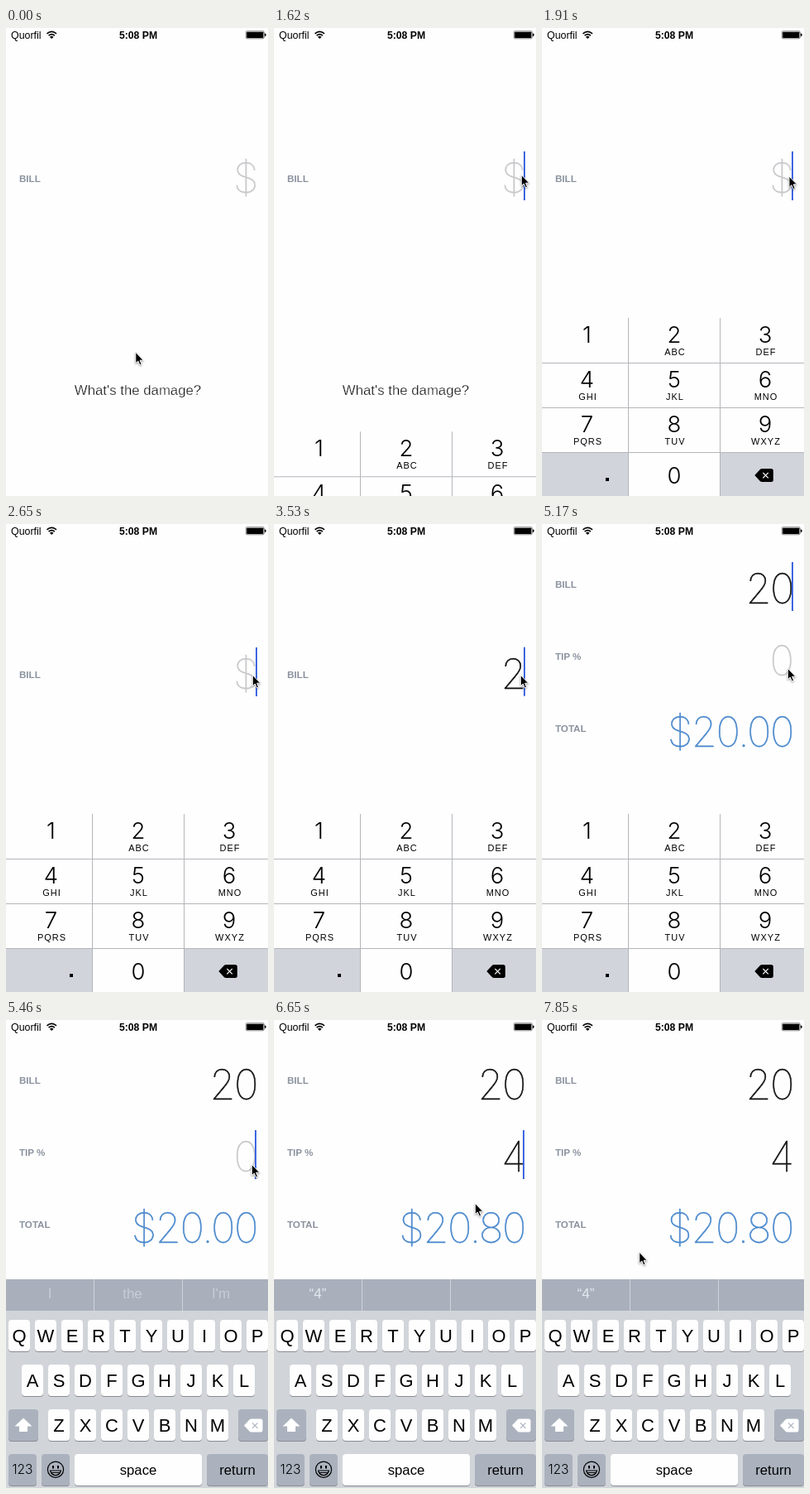
Recreate the animation shown at these times as an HTML page. Size 317x565 px, loop 8 s.

```html
<!DOCTYPE html>
<html lang="en">
<head>
<meta charset="utf-8">
<title>Tip calculator</title>
<style>
  html, body { margin: 0; height: 100%; overflow: hidden; background: #fefefe; }
  svg { display: block; width: 100vw; height: 100vh; }
  text { font-family: "Liberation Sans", Arial, sans-serif; white-space: pre; }
  .mid { text-anchor: middle; }
  .label { font-size: 11.6px; font-weight: bold; fill: #8a929e; }
  .big { font: 100 50px Inter, sans-serif; font-optical-sizing: none; letter-spacing: -1.5px;
    text-anchor: end; stroke-width: .6px; }
  .digit { font-family: Inter, sans-serif; font-weight: 350; }
  .ask { font-size: 16.8px; fill: #111; stroke: #fefefe; stroke-width: .35px; }
  .caret { fill: #3f66e0; }
  .sub { font-size: 11px; letter-spacing: 1px; }
  .line { stroke: #b4b6ba; }
</style>
</head>
<body>
<svg viewBox="0 0 317 565">
  <rect width="317" height="565" fill="#fefefe"/>
  <g id="status">
    <text x="6" y="13" font-size="12.4">Quorfil</text>
    <g fill="none" stroke="#000" stroke-width="1.7">
      <path d="M49.5 6.8Q55.2 1.8 61 6.8M51.6 9.1Q55.2 6 58.9 9.1"/>
      <path d="M55.2 13L52.9 10.7Q55.2 9 57.6 10.7Z" fill="#000" stroke="none"/>
    </g>
    <text x="160" y="13" class="mid" font-size="12.2" font-weight="bold">5:08 PM</text>
    <rect x="290.3" y="3.8" width="22" height="9" rx="1.5" fill="none" stroke="#000" stroke-width=".5"/>
    <rect x="291.2" y="4.7" width="20.2" height="7.2" rx=".6"/>
    <rect x="313" y="6.5" width="1.5" height="3.5" rx=".7"/>
  </g>
  <text class="ask mid" x="159.5" y="443">What's the damage?</text>

  <text class="label" id="billLabel" x="16">BILL</text>
  <text class="big" id="bill" x="304"></text>
  <g id="results">
    <text class="label" x="16" y="164">TIP %</text>
    <text class="big" id="tip" x="303.5" y="183"></text>
    <text class="label" x="16" y="251">TOTAL</text>
    <text class="big" id="total" x="304" y="269"></text>
  </g>
  <rect class="caret" id="caret" width="2" height="59"/>

  <g id="keypad"></g>
  <g id="keyboard"></g>

  <path id="cursor" d="M.3 .3V13.8L3.3 11L5.5 16L7.6 15.1L5.6 10.2H9.8Z"
    stroke="#fff" style="filter:drop-shadow(0 1px 1px #0006)"/>
</svg>
<script>
const $ = id => document.getElementById(id);
const clamp = v => Math.max(0, Math.min(1, v));
const smooth = v => (v = clamp(v)) * v * (3 - 2 * v);
const inOut = v => (v = clamp(v)) < .5 ? 4 * v ** 3 : 1 - 4 * (1 - v) ** 3;
const mid = (x, y, text, size, kind = '') =>
  `<text class="mid ${kind}" x="${x}" y="${y}" font-size="${size}">${text}</text>`;
const rect = (x, y, w, h, fill) =>
  `<rect x="${x}" y="${y}" width="${w}" height="${h}" fill="${fill}"/>`;
const backspace = (x, y, fill, cross) =>
  `<g transform="translate(${x} ${y})"><path fill="${fill}"
    d="M0 8L6.5 1Q7.5 0 9 0H20Q22.5 0 22.5 2.5V13.5Q22.5 16 20 16H9Q7.5 16 6.5 15Z"/>
    <path d="M10 4.8l6.5 6.5m0-6.5l-6.5 6.5" stroke="${cross}" stroke-width="1.2"/></g>`;

function keypad() {
  const letters = ['', 'ABC', 'DEF', 'GHI', 'JKL', 'MNO', 'PQRS', 'TUV', 'WXYZ'];
  const centers = [54.5, 160, 270];
  let s = rect(0, 0, 317, 215, '#fefefe')
    + rect(0, 162, 104, 53, '#d1d4da') + rect(216, 162, 101, 53, '#d1d4da')
    + '<path class="line" d="M104.5 0V215M215.5 0V215M0 54.5H317M0 108.5H317M0 162.5H317"/>';
  letters.forEach((sub, i) => {
    const x = centers[i % 3], y = 54 * Math.floor(i / 3);
    s += mid(x, y + 30, i + 1, 27.5, 'digit') + mid(x + 1, y + 45, sub, 11, 'sub');
  });
  return s + mid(160, 200, 0, 27.5, 'digit') + rect(77, 193, 4, 4, '#000')
    + backspace(257.3, 182, '#000', '#fff');
}

function keyboard() {
  const grey = '#abb2be';
  const key = (x, y, w, fill, label = '', size = 22, kind = '') =>
    `<rect x="${x}" y="${y + 1}" width="${w}" height="38" rx="4" fill="#888c92"/>
     <rect x="${x}" y="${y}" width="${w}" height="38" rx="4" fill="${fill}"/>`
    + mid(x + w / 2, y + 18.7 + size * .36, label, size, kind);
  let s = rect(0, 313, 317, 252, '#d1d5da') + rect(0, 313, 317, 38, '#a9b0bc')
    + '<path d="M106.5 313V351M213.5 313V351" stroke="#cfd3da"/>';
  [['QWERTYUIOP', 3], ['ASDFGHJKL', 19], ['ZXCVBNM', 51]].forEach(([row, x], r) =>
    [...row].forEach((c, i) => s += key(x + 32 * i, 362 + 54 * r, 26, '#fefefe', c)));
  s += key(3, 470, 36, grey) + key(281, 470, 36, grey) + key(3, 524, 34, grey, '123', 15.5, 'digit')
    + key(43, 524, 34, grey) + key(83, 524, 154, '#fefefe', 'space', 16.7)
    + key(243, 524, 74, grey, 'return', 16.7)
    + '<path fill="#fff" d="M21 480.5L31.5 490.5H26V497H16V490.5H10.5Z"/>'
    + backspace(288, 481.5, '#fff', grey)
    + `<g fill="none" stroke="#000" stroke-width="1.2"><circle cx="60" cy="542.7" r="9.6"/>
       <path d="M53.6 544H66.4Q65 549.6 60 549.6T53.6 544ZM55 546.5H65"/>
       <path d="M57 538v3.4M63 538v3.4" stroke-width="2"/></g><g id="hints" fill="#e6e9ee">`;
  [53, 153, 260].forEach(x => s += mid(x, 336, '', 17));
  return s + '</g>';
}

$('keypad').innerHTML = keypad();
$('keyboard').innerHTML = keyboard();
const hints = [...$('hints').children];

// All times below are counted in ticks of 148 ms.
const LOOP = 8000, TICK = 148;
const path = [[4, 156.5, 391], [10, 299, 177], [12, 299, 177], [15, 298, 182], [33, 298, 182],
  [35, 297, 174], [43, 297, 174], [45, 243, 221], [47, 117.5, 281], [52, 117.5, 281], [53, 117.5, 280]];
const blinks = [[0, 0], [10, 1], [15, .5], [16, 0], [18, 1], [21, .5], [22, 0], [24, 1], [31, .5], [32, 0],
  [34, 1], [40, .5], [41, 0], [42, 1], [46, .5], [47, 0], [49, 1], [53, 0]];

function cursorAt(k) {
  const i = path.findIndex(p => p[0] > k);
  if (i < 1) return i ? path.at(-1).slice(1) : path[0].slice(1);
  const [a, b] = [path[i - 1], path[i]];
  let p = (k - a[0]) / (b[0] - a[0]);
  if (i === 1) p = smooth(p);
  return [1, 2].map(n => a[n] + (b[n] - a[n]) * p);
}

function put(id, text, color) {
  const el = $(id);
  el.textContent = text;
  el.setAttribute('fill', color);
  el.setAttribute('stroke', color);
}

function draw(now) {
  const k = Math.floor((now % LOOP + 30) / TICK);
  const lift = inOut((k - 23.6) / 4.5);
  const onTip = k >= 36, typedTip = k >= 42;

  put('bill', k < 24 ? '$' : k < 25 ? '2' : '20', k < 24 ? '#c8c8cb' : '#111');
  put('tip', typedTip ? '4' : '0', typedTip ? '#111' : '#c8c8cb');
  put('total', k < 25 ? '$2.00' : typedTip ? '$20.80' : '$20.00', '#4a88cc');
  $('bill').setAttribute('y', 199 - 103 * lift);
  $('billLabel').setAttribute('y', 186 - 109 * lift);
  $('results').setAttribute('opacity', clamp((k - 24) / 3));

  $('caret').setAttribute('x', onTip ? 301 : 302);
  $('caret').setAttribute('y', onTip ? 133 : 149 - 103 * lift);
  $('caret').setAttribute('opacity', blinks.findLast(b => b[0] <= k)[1]);

  $('keypad').setAttribute('transform', `translate(0 ${565 - 215 * smooth((k - 9.78) / 3)})`);
  $('keyboard').setAttribute('visibility', onTip ? 'visible' : 'hidden');
  $('hints').setAttribute('opacity', clamp((k - 36) / 2));
  (typedTip ? ['“4”', '', ''] : ['I', 'the', "I'm"]).forEach((h, i) => hints[i].textContent = h);

  $('cursor').setAttribute('transform', `translate(${cursorAt(k)})`);
}

function loop() {
  draw(performance.now());
  requestAnimationFrame(loop);
}
loop();
</script>
</body>
</html>
```
